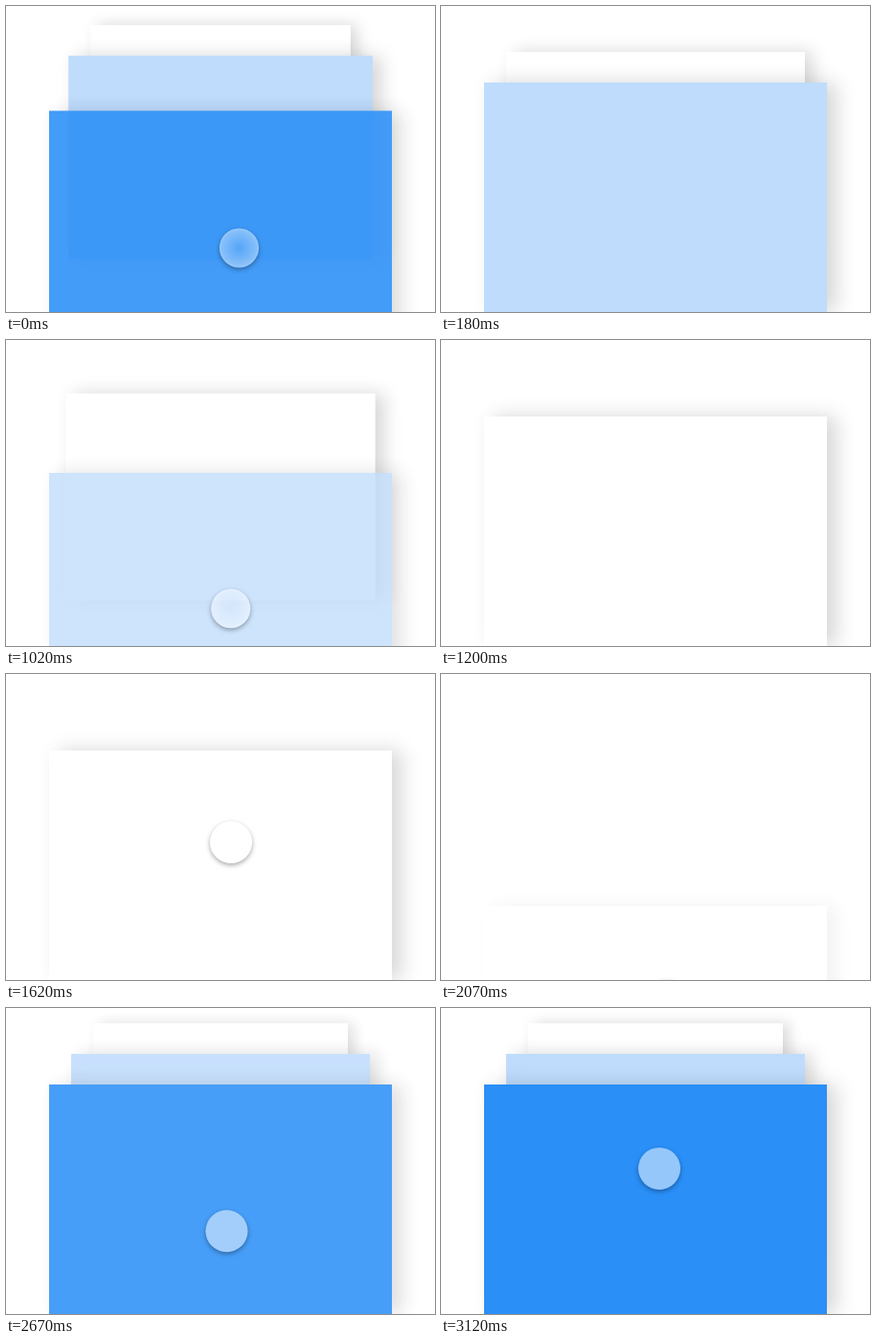
Animation of 448x320 px, one loop 3150 ms. Source, as an HTML page:

```html
<!DOCTYPE html>
<html lang="en">
<head>
<meta charset="utf-8">
<title>Card stack</title>
<style>
html, body { margin: 0; width: 100%; height: 100%; overflow: hidden; background: #fff; }
#stage { position: relative; width: 100%; height: 100%; overflow: hidden; contain: strict; }
#stack { position: absolute; inset: 0; }
.card {
  position: absolute; left: 0; top: 0; width: 358px; height: 240px;
  transform-origin: 0 0; box-shadow: 10px 0 20px rgba(0, 0, 0, .16);
}
#finger {
  position: absolute; left: -22px; top: -22px; width: 44px; height: 44px;
  border-radius: 50%; background: rgba(255, 255, 255, .5);
  box-shadow: 0 2px 5px rgba(0, 0, 0, .35);
}
#finger.down {
  left: -20.5px; top: -20px; width: 41px; height: 41px;
  background: radial-gradient(circle closest-side, rgba(255, 255, 255, .13), rgba(255, 255, 255, .38) 88%, rgba(255, 255, 255, .5));
}
</style>
</head>
<body>
<div id="stage">
  <div id="stack">
    <div class="card" style="background:#fff"></div>
    <div class="card" style="background:#bfdcfd"></div>
    <div class="card" style="background:#2a8ff7"></div>
  </div>
  <div id="finger"></div>
</div>
<script>
const LOOP = 3150, STEP = 30, TRAVEL = 240;
const REST = 2070, RESET = 2280;
const SWIPES = [-11.8, 996.3, 1999, 3138.2];

// Finger path around one swipe: ms from touch-down, x, y
const PATH = [
  [-710, 230, 372], [-648, 230, 335], [-516, 228, 264], [-379, 235, 176],
  [-230, 236, 146], [-75, 231, 148], [-18, 228, 168], [0, 240, 223],
  [12, 243, 253], [24, 234, 281], [71, 235, 340], [120, 235, 372]
];

const stack = document.getElementById('stack');
const finger = document.getElementById('finger');
const cards = [...stack.children].reverse();
const clamp = v => Math.max(0, Math.min(1, v));
const dragged = u => Math.sin(clamp(u / 150) * Math.PI / 2);

function pathAt(u) {
  const i = PATH.findIndex(k => k[0] > u);
  if (i < 0) return PATH[PATH.length - 1].slice(1);
  if (i === 0) return PATH[0].slice(1);
  const [t0, x0, y0] = PATH[i - 1], [t1, x1, y1] = PATH[i];
  const f = (u - t0) / (t1 - t0);
  return [x0 + (x1 - x0) * f, y0 + (y1 - y0) * f];
}

function draw(t) {
  const fresh = t >= RESET;
  if (!fresh) t = Math.min(t, REST);
  const swipes = fresh ? SWIPES.slice(3) : SWIPES.slice(0, 3);
  const gone = swipes.reduce((sum, s) => sum + dragged(t - s), 0);

  stack.style.opacity = fresh ? clamp((t - 2250) / 490) : 1;
  cards.forEach((card, i) => {
    const depth = i - gone;
    const back = Math.max(0, depth), out = clamp(-depth);
    const x = 45 + 23 * back, y = 80 - 32 * back + TRAVEL * out;
    card.style.transform = `translate(${x}px, ${y}px) scale(${1 - 46 * back / 358})`;
    card.style.opacity = 1 - out;
  });

  const u = t - SWIPES.find(s => t < s + 200);
  const [x, y] = pathAt(u);
  finger.className = u >= 0 ? 'down' : '';
  finger.style.transform = `translate(${x}px, ${y}px)`;
}

const start = performance.now();
function tick() {
  const t = (performance.now() - start) % LOOP;
  draw(Math.floor(t / STEP) * STEP);
  requestAnimationFrame(tick);
}
tick();
</script>
</body>
</html>
```
